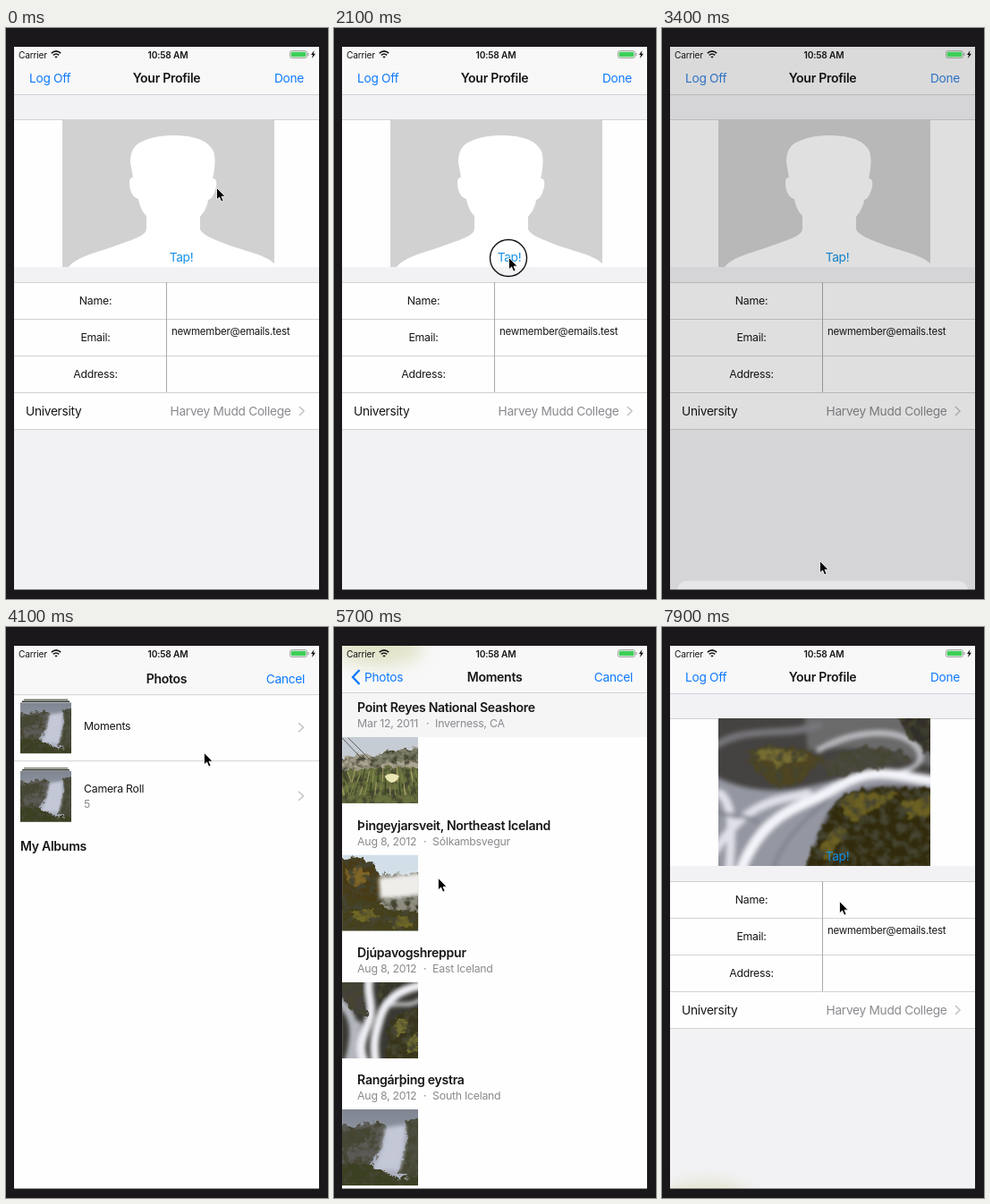
An HTML page for the animation above (8000 ms loop, 360 px wide and 638 px high).

```html
<!DOCTYPE html>
<html lang="en">
<head>
<meta charset="utf-8">
<title>Profile photo picker</title>
<style>
html, body { margin: 0; height: 100%; overflow: hidden; background: #1a181b; }
svg.stage { display: block; width: 100vw; height: 100vh; }
text { font: 13.7px Inter, "Open Sans", sans-serif; letter-spacing: -.02em; fill: #161616; white-space: pre; }
text.bold { font-size: 14.05px; font-weight: 600; }
text.mid { text-anchor: middle; }
text.end { text-anchor: end; }
text.small { font-size: 12.3px; }
text.tiny { font-size: 10.2px; }
text.mail { font-size: 11.5px; }
text.grey { fill: #8a8a8f; }
text.blue { fill: #0d7aff; }
.line { stroke: #d2d1d5; fill: none; }
.more { stroke: #c2c2c7; stroke-width: 1.5; fill: none; }
</style>
</head>
<body>
<svg class="stage" viewBox="0 0 360 638">
<defs>
  <!-- Ragged edges with dark mottling -->
  <filter id="rough">
    <feTurbulence type="fractalNoise" baseFrequency=".11" numOctaves="4" seed="4" result="noise"/>
    <feDisplacementMap in="SourceGraphic" in2="noise" scale="12" xChannelSelector="R" yChannelSelector="G" result="shape"/>
    <feColorMatrix in="noise" values="0 0 0 0 .06  0 0 0 0 .06  0 0 0 0 .03  0 0 3.6 0 -1.5"/>
    <feComposite in2="shape" operator="in" result="spots"/>
    <feMerge><feMergeNode in="shape"/><feMergeNode in="spots"/></feMerge>
    <feGaussianBlur stdDeviation=".8"/>
  </filter>
  <filter id="soft" x="-50%" y="-50%" width="200%" height="200%"><feGaussianBlur stdDeviation="2.6"/></filter>
  <filter id="glow" x="-50%" y="-80%" width="200%" height="260%"><feGaussianBlur stdDeviation="9"/></filter>
  <linearGradient id="shade"><stop stop-color="#000" stop-opacity="0"/><stop offset="1" stop-color="#000" stop-opacity=".14"/></linearGradient>
  <linearGradient id="haze" x2="0" y2="1"><stop stop-color="#7f8590"/><stop offset="1" stop-color="#b4b8c6"/></linearGradient>

  <symbol id="river" viewBox="0 0 237 165">
    <rect width="237" height="165" fill="#454341"/>
    <g filter="url(#soft)" fill="none" stroke-linecap="round">
      <path d="M-9 62C30 84 70 84 110 74S170 60 250 66V82C200 72 160 74 138 90S110 140 96 180H-9Z" fill="#9497a2"/>
      <path d="M96 -9H205L250 28V60C200 34 150 30 100 36Z" fill="#6b6a6b"/>
      <path d="M-9 34C30 6 70 22 112 8" stroke="#77767a" stroke-width="8"/>
      <path d="M112 36C148 14 200 8 222 32 240 58 196 62 160 66" stroke="#c6c7cc" stroke-width="5"/>
      <path d="M24 172C52 100 92 102 134 76S200 66 245 70" stroke="#f4f5fa" stroke-width="11"/>
      <path d="M-5 150C30 95 60 92 100 84M2 84C16 96 16 120 12 172" stroke="#e0e1e9" stroke-width="9"/>
      <path d="M60 170C74 132 98 112 122 92M-4 104C20 112 36 108 44 116" stroke="#7f828e" stroke-width="4"/>
    </g>
    <g filter="url(#rough)">
      <path d="M32 38C55 24 98 32 120 46 102 56 98 72 78 78 54 76 42 60 32 38Z" fill="#4f4522"/>
      <path d="M36 40C56 28 82 34 100 44L66 54Z" fill="#776d33"/>
      <path d="M116 50L160 32 206 36 212 48 160 58 126 68Z" fill="#4b4840"/>
      <path d="M196 -9H250V42C230 40 214 28 196 -9Z" fill="#302d29"/>
      <path d="M92 180C108 136 126 104 136 88 166 72 202 82 250 78V180Z" fill="#33290f"/>
      <path d="M136 92C160 78 190 86 204 84L176 100 148 118ZM206 94L245 84V104L212 114ZM112 146L134 118 142 128 122 160Z" fill="#6c6120"/>
    </g>
  </symbol>

  <symbol id="cascade" viewBox="0 0 100 100">
    <rect width="100" height="100" fill="#3a3934"/>
    <g filter="url(#soft)" fill="none" stroke-linecap="round">
      <path d="M-5 24C14 40 22 60 8 106M20 56C14 80 12 90 24 106" stroke="#b4b6be" stroke-width="11"/>
      <path d="M36 -6C30 16 44 30 34 54S22 90 30 106M104 4C72 10 56 26 50 46S40 80 44 104" stroke="#eeeff4" stroke-width="11"/>
      <path d="M66 30C80 26 88 34 104 22" stroke="#c4c5c8" stroke-width="5"/>
    </g>
    <g filter="url(#rough)">
      <path d="M-9 -9H30L26 22 34 46 20 40 -9 16Z" fill="#45433a"/>
      <path d="M46 -9H90L64 10 48 28Z" fill="#36342b"/>
      <path d="M56 110L60 60 72 40 110 34V110Z" fill="#39351b"/>
      <path d="M64 60L78 46 88 54 74 74ZM84 76L100 66V90L86 92Z" fill="#6f6c30"/>
    </g>
  </symbol>

  <symbol id="dunes" viewBox="0 0 100 100">
    <rect width="100" height="100" fill="#c6ccd3"/>
    <g filter="url(#rough)">
      <path d="M-9 48Q20 28 46 40T110 30V110H-9Z" fill="#aaa592"/>
      <path d="M40 42Q60 26 110 28V46Q70 40 40 52Z" fill="#7d7e68"/>
      <path d="M-9 60Q40 50 110 54V110H-9Z" fill="#69703f"/>
    </g>
    <g id="grass" stroke-width="1.2"></g>
    <path d="M0 14L30 46M8 14L36 42" stroke="#4b4c4d"/>
    <path d="M56 64Q65 58 75 64 72 72 65 73 58 70 56 64Z" fill="#eae6b4"/>
  </symbol>

  <symbol id="falls" viewBox="0 0 100 100">
    <rect width="100" height="100" fill="#d3dfe8"/>
    <g filter="url(#rough)">
      <path d="M30 28L110 24V80H30Z" fill="#8f8d80"/>
      <path d="M-9 6L30 4Q42 14 50 28L56 56 44 68 -9 76Z" fill="#4a3a17"/>
      <path d="M2 22L24 14 38 30 26 42 8 38Z" fill="#7f6526"/>
    </g>
    <path d="M48 30L104 24V52L78 56 50 58Z" fill="#eeedea" filter="url(#soft)"/>
    <g filter="url(#rough)">
      <path d="M-9 62Q30 52 50 66T110 72V110H-9Z" fill="#45411a"/>
      <path d="M8 78L34 70 52 82 30 90ZM60 84L86 80 92 92 70 96Z" fill="#6f6826"/>
    </g>
  </symbol>

  <symbol id="gorge" viewBox="0 0 100 100">
    <rect width="100" height="100" fill="url(#haze)"/>
    <g filter="url(#rough)">
      <path d="M-9 24L48 16 60 26 50 56 36 76 -9 86Z" fill="#5b5a55"/>
      <path d="M-9 32L40 22 36 38 -9 54Z" fill="#474839"/>
      <path d="M84 14L110 10V96L74 86Q86 50 84 14Z" fill="#4d4f41"/>
    </g>
    <path d="M56 24L84 20Q84 50 76 80H40Q54 54 56 24Z" fill="#c3c7d6" filter="url(#soft)"/>
    <g filter="url(#rough)">
      <path d="M-9 72Q30 66 56 82T110 82V110H-9Z" fill="#3b4024"/>
    </g>
  </symbol>

  <g id="cover">
    <path d="M20 79H69" stroke="#777a70" stroke-width="1.5"/>
    <path d="M18 81H71" stroke="#33372c" stroke-width="1.5"/>
    <use href="#gorge" x="16" y="82" width="57" height="57"/>
  </g>
</defs>

<!-- Profile form -->
<rect width="360" height="638" fill="#f2f1f4"/>
<path d="M9 21H350V74H9Z" fill="#f8f8f9"/>
<path d="M9 102H350V267H9ZM9 284H350V448H9Z" fill="#fefefe"/>
<path class="line" d="M9 74.5H350M9 102.5H350M9 284.5H350M9 325.5H350M9 366.5H350M9 407.5H350M9 448.5H350"/>
<path d="M179.5 284V407" stroke="#a9a9ad"/>
<g id="avatar">
  <path d="M63 102H300V267H63Z" fill="#d2d1d2"/>
  <path d="M70 267C78 257 96 252 112 247L140 237C150 233 157 230 157 224V210C152 205 149 198 148 191 142 190 138 182 138 173 138 168 140 167 142 167L139 150C139 137 144 130 152 127 163 121 178 120 187 120 206 120 226 124 232 138 235 147 233 160 231 168 235 168 236 172 235 177 233 186 230 191 226 192 225 200 221 206 217 211V225C220 232 235 237 250 243 270 250 290 254 300 263V267Z" fill="#fff"/>
</g>
<use id="chosen" href="#river" x="63" y="102" width="237" height="165"/>
<text class="nav" x="26" y="61">Log Off</text>
<text class="bold mid" x="179.5" y="61">Your Profile</text>
<text class="nav end" x="333" y="61">Done</text>
<text class="mid" x="196" y="261" style="fill:#1291e6">Tap!</text>
<text class="small mid" x="100" y="309">Name:</text>
<text class="small mid" x="100" y="350">Email:</text>
<text class="small mid" x="100" y="391">Address:</text>
<text class="mail" x="185" y="343">newmember@emails.test</text>
<text x="22" y="433">University</text>
<text class="grey end" x="318.5" y="433">Harvey Mudd College</text>
<path class="more" d="M328 423L333 428 328 433"/>

<!-- Action sheet -->
<rect id="dim" width="360" height="638"/>
<g id="sheet">
  <rect x="17" y="572" width="325" height="47" rx="11" fill="#e6e5e8"/>
  <text class="blue mid" x="179" y="601.6" style="font-size:15.5px">Select From Photo Album</text>
</g>

<!-- Photo picker -->
<g id="picker">
  <path d="M0 21H360V660H0Z" fill="#fefefe"/>
  <g id="albums">
    <path id="pressed" d="M9 74H452V147.500H9Z" fill="#e2e0e3"/>
    <use href="#cover"/>
    <use href="#cover" y="76.5"/>
    <path class="line" d="M9 147.500H350"/>
    <text class="small" x="87" y="113">Moments</text>
    <text class="small" x="87" y="183">Camera Roll</text>
    <text class="small grey" x="87" y="200">5</text>
    <text class="bold" x="16" y="248">My Albums</text>
    <path class="more" d="M327 105L332.500 110 327 115M327 181.500L332.500 186.500 327 191.500"/>
  </g>
  <path id="veil" d="M0 74H360V638H0Z"/>
  <g id="moments">
    <path d="M0 21H9V638H0Z" fill="url(#shade)"/>
    <path d="M9 21H350V638H9Z" fill="#fefefe"/>
    <g id="rows"></g>
  </g>
  <path d="M9 21H350V73.500H9Z" fill="#f8f8f9"/>
  <ellipse id="tint" cx="50" cy="24" rx="50" ry="20" fill="#d9dcb6" opacity=".7" filter="url(#glow)"/>
  <path class="line" d="M9 73.500H350"/>
  <text id="oldTitle" class="bold mid" y="61">Photos</text>
  <text id="newTitle" class="bold mid" y="61">Moments</text>
  <path id="arrow" d="M28.500 48L21 56 28.500 64" fill="none" stroke="#0d7aff" stroke-width="2.300"/>
  <text id="back" class="blue" y="61">Photos</text>
  <text class="blue end" x="334" y="61">Cancel</text>
</g>

<!-- Status bar -->
<text class="tiny" x="14" y="33.500">Carrier</text>
<g fill="none" stroke="#111" stroke-width="1.600">
  <path d="M50.800 28.200Q56 23.600 61.200 28.200M52.800 30.400Q56 27.600 59.200 30.400"/>
  <path d="M54.800 32L56 33.300 57.200 32Z" fill="#111" stroke-width=".8"/>
</g>
<text class="bold mid" x="181" y="33.500" style="font-size:10.200px">10:58 AM</text>
<rect x="317.500" y="25.500" width="19" height="8" rx="2" fill="none" stroke="#8f9190" stroke-width=".8"/>
<rect x="318.700" y="26.700" width="16.600" height="5.600" rx="1" fill="#3fce58"/>
<path d="M338 28V31" stroke="#8f9190"/>
<path d="M344.500 25L341 30H343L342 34 346 28.700H343.700Z" fill="#111"/>

<path d="M0 0H360V638H0ZM9 21V627.400H350V21Z" fill="#1a181b" fill-rule="evenodd"/>
<g id="cursor">
  <circle id="ring" cx="-1" cy="0" r="20.500" fill="none" stroke="#111" stroke-width="1.400"/>
  <path d="M-.5 -.5V12.800L2.600 10 4.700 15 7 14 5 9.200H9Z" fill="#000" stroke="#fff" stroke-width=".8"/>
</g>
</svg>
<script>
const $ = id => document.getElementById(id);
const LOOP = 8000;

const places = [
  ["dunes", 95, 112, "Point Reyes National Seashore", "Mar 12, 2011", "Inverness, CA", 113],
  ["falls", 227, 254.5, "Þingeyjarsveit, Northeast Iceland", "Aug 8, 2012", "Sólkambsvegur", 110],
  ["cascade", 369, 397, "Djúpavogshreppur", "Aug 8, 2012", "East Iceland", 110],
  ["gorge", 511, 539, "Rangárþing eystra", "Aug 8, 2012", "South Iceland", 110]
];
$("rows").innerHTML = places.map(([photo, y, top, title, date, place, x], i) => `
  <use href="#${photo}" x="9" y="${top}" width="85" height="85"/>
  ${i ? "" : '<path d="M9 74H350V123H9Z" fill="#f5f5f6"/>'}
  <text class="bold" x="26" y="${y}">${title}</text>
  <text class="small grey" x="26" y="${y + 16.5}">${date}</text>
  <text class="small grey mid" x="${x - 8.5}" y="${y + 16.5}">·</text>
  <text class="small grey" x="${x}" y="${y + 16.5}">${place}</text>`).join("");

// Blades of dune grass
const greens = ["#7f8a45", "#3c4a22", "#a3a063"];
$("grass").innerHTML = Array.from({ length: 45 }, (_, i) => {
  const x = i * 37 % 101, y = 72 + i * 17 % 34;
  return `<path d="M${x} ${y}l${i * 7 % 11 - 5} -${10 + i * 5 % 12}" stroke="${greens[i % 3]}"/>`;
}).join("");

// Time, x, y of the pointer tip
const path = [
  [0, 236, 179], [800, 196, 258], [1300, 197, 262], [1800, 196, 257], [2350, 196, 257],
  [2950, 177, 596], [3450, 177, 596], [4100, 222, 141], [4600, 198, 110], [4950, 198, 110],
  [5700, 117, 281], [6150, 58, 436], [6500, 58, 436], [7200, 150, 338], [7900, 199, 307], [8000, 199, 307]
];
const taps = [2000, 3050, 4650, 6220];

const spring = ms => ms < 0 ? 0 : 1 - (1 + ms * .012) * Math.exp(-ms * .012);
const show = (id, on) => $(id).setAttribute("visibility", on ? "visible" : "hidden");
const move = (id, x, y) => $(id).setAttribute("transform", `translate(${x} ${y})`);
const fade = (id, a) => $(id).setAttribute("opacity", a);
const navItems = document.querySelectorAll(".nav");

function pointer(t) {
  const i = path.findIndex(p => p[0] > t);
  const [t0, x0, y0] = path[i - 1], [t1, x1, y1] = path[i];
  const u = (t - t0) / (t1 - t0), k = u * u * (3 - 2 * u);
  return [x0 + (x1 - x0) * k, y0 + (y1 - y0) * k];
}

function draw(t) {
  const sheet = spring(t - 2200) - spring(t - 3200);
  const modal = spring(t - 3450) - spring(t - 6400);
  const push = spring(t - 4838);

  fade("dim", .4 * sheet);
  move("sheet", 0, 66 * (1 - sheet));
  navItems.forEach(n => n.style.fill = `color-mix(in srgb, #8e8e93 ${sheet * 100}%, #0d7aff)`);
  show("avatar", t < 6400);
  show("chosen", t >= 6400);

  // Children inherit visibility, so the picker is parked below the screen instead
  move("picker", 0, 617 * (1 - modal));
  fade("pressed", t >= 4700 ? 1 : 0);
  move("albums", -102 * push, 0);
  fade("veil", .1 * push);
  move("moments", 341 * (1 - push), 0);
  fade("moments", push > 0 ? 1 : 0);
  move("tint", 341 * (1 - push), 0);
  fade("tint", push > 0 ? .7 : 0);
  $("oldTitle").setAttribute("x", 179.5 - 88 * push);
  fade("oldTitle", Math.max(0, Math.min(1, 1.3 - 1.6 * push)));
  $("newTitle").setAttribute("x", 179.5 + 196 * (1 - push));
  fade("newTitle", push);
  $("back").setAttribute("x", 34 + 110 * (1 - push));
  fade("back", Math.max(0, 2 * push - 1));
  fade("arrow", push);

  move("cursor", ...pointer(t));
  show("ring", taps.some(s => t >= s && t < s + 170));
}

function tick() {
  draw(performance.now() % LOOP);
  requestAnimationFrame(tick);
}
tick();
</script>
</body>
</html>
```
